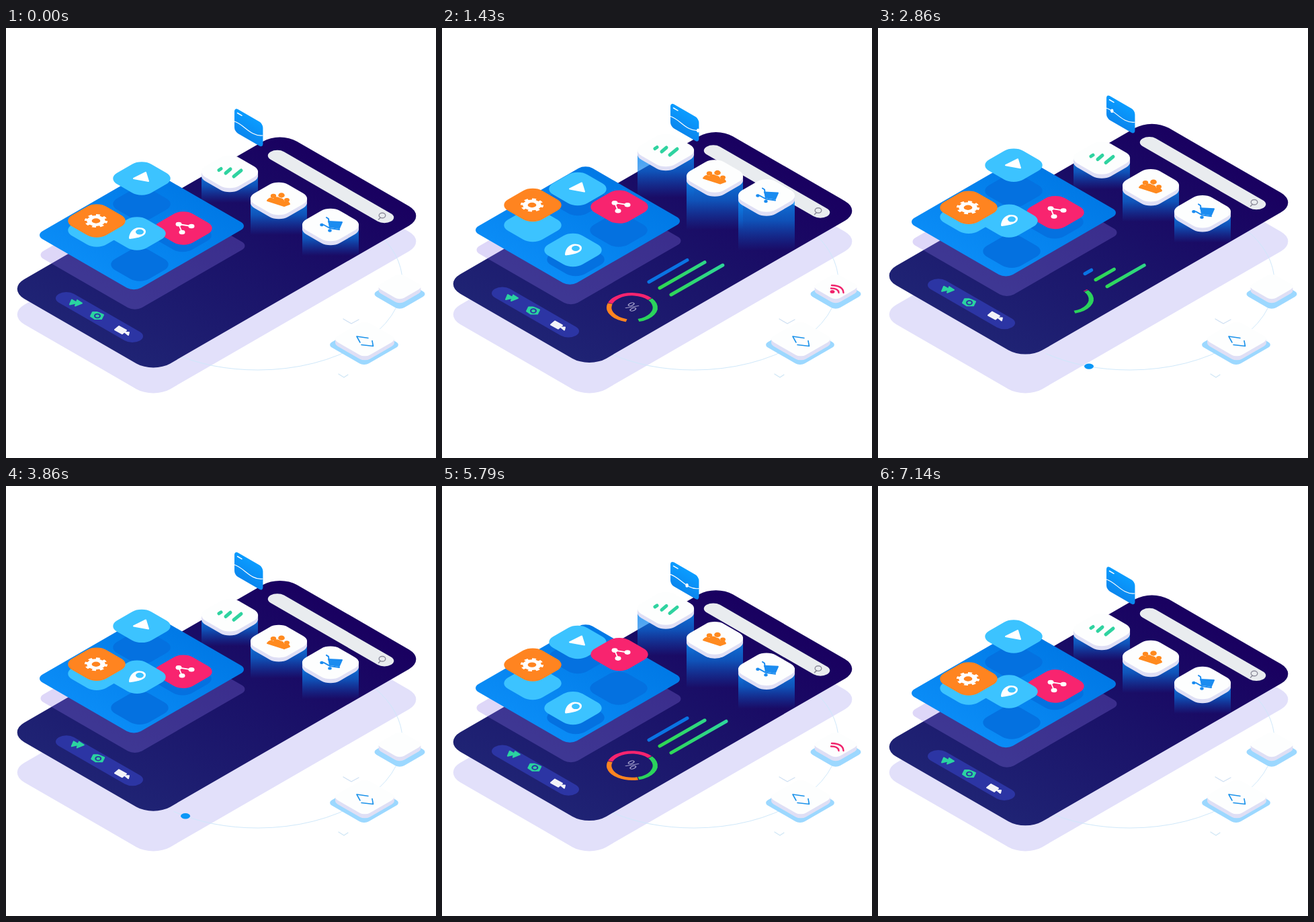
Recreate the animation shown at these times as an HTML page. Size 640 by 640 pixels, loop 7.21 s.

```html
<!DOCTYPE html>
<html lang="en">
<head>
<meta charset="utf-8">
<title>Isometric phone</title>
<style>
html, body { margin: 0; width: 100%; height: 100%; overflow: hidden; background: #fff; }
svg { display: block; width: 100%; height: 100%; }
</style>
</head>
<body>
<svg id="stage" viewBox="0 0 640 640"></svg>
<script>
const LOOP = 7210, HALF = LOOP / 2;
const stage = document.getElementById('stage');

// Rounded rectangle on the ground plane: w runs up-right, h runs down-right.
const iso = (x, y, w, h, r, fill, extra = '') =>
  `<rect x="${-w / 2}" y="${-h / 2}" width="${w}" height="${h}" rx="${r}" fill="${fill}" ${extra}
    transform="matrix(.866 -.5 .866 .5 ${x} ${y})"/>`;
const flat = (x, y, body) => `<g transform="translate(${x} ${y}) scale(1.2247 .7071)">${body}</g>`;
const line = (d, color, width, extra = '') =>
  `<path d="${d}" fill="none" stroke="${color}" stroke-width="${width}" stroke-linecap="round" stroke-linejoin="round" ${extra}/>`;
const shape = (d, fill) => `<path d="${d}" fill="${fill}" stroke="${fill}" stroke-width="2" stroke-linejoin="round"/>`;
const oval = (x, y, rx, ry, fill) => `<ellipse cx="${x}" cy="${y}" rx="${rx}" ry="${ry}" fill="${fill}"/>`;
const slab = (x, y, s, r, depth) =>
  [1, .66, .33].map(k => iso(x, y + depth * k, s, s, r, '#dfdff5')).join('') + iso(x, y, s, s, r, '#fdfefe');
const gradient = (id, stops, dir) =>
  `<linearGradient id="${id}" ${dir}>` +
  stops.map(([at, color, a = 1]) => `<stop offset="${at}" stop-color="${color}" stop-opacity="${a}"/>`).join('') +
  `</linearGradient>`;

const glyphs = {
  play: shape('M-12 0L6 -9L10 4Z', '#fff'),
  gear: flat(-1, 0, `<circle r="8.2" fill="none" stroke="#fff" stroke-width="6"/>
    <circle r="12" fill="none" stroke="#fff" stroke-width="4" pathLength="16" stroke-dasharray="1"/>`),
  pin: `<path d="M-12 7C-12 -1 -6 -9 3 -9C10 -9 13 -6 13 -3C13 3 5 6 -11 8Z" fill="#fff"/>` +
    oval(4, -2.5, 6, 4, '#3cc3ff'),
  share: line('M-2 6L-7 -6L12 -3', '#fff', 1.8) +
    oval(-7, -6, 4.5, 3.3, '#fff') + oval(12, -3, 4.5, 3.3, '#fff') + oval(-2, 6, 4.5, 3.3, '#fff'),
  bars: line('M-16 -2.5L-13 -4.5M-6 2L1 -4M6 7L17 -2', '#2fd3a0', 5),
  people: shape('M-17 3Q-13 -3 -8 1Q-4 -4 2 0Q8 1 7 5Q14 3 16 8L8 11Z', '#ff8a1f') +
    oval(-8, -4, 4.2, 3.2, '#ff8a1f') + oval(4, -5, 4.8, 3.7, '#ff8a1f') + oval(12, 2, 4, 3, '#ff8a1f'),
  cart: line('M-6 -11L-3 -9L-1 5L13 7M-10 0L-1 5', '#1b8cf0', 2) +
    shape('M-3 -5L17 -4L13 5L0 3Z', '#1b8cf0') +
    oval(-13, 0, 2.7, 2.2, '#1b8cf0') + oval(-1, 8.5, 2.7, 2.2, '#1b8cf0')
};

const ease = p => (1 - Math.cos(Math.PI * Math.min(1, Math.max(0, p)))) / 2;
// Rise at a, fall at b.
const pulse = (u, a, b, rise = 740, fall = 760) => ease((u - a) / rise) - ease((u - b) / fall);

const apps = [
  { id: 'play',  x: 202, y: 224, dy: 23,  a: 0,    b: 1900, fill: '#3cc3ff' },
  { id: 'share', x: 264, y: 298, dy: -40, a: 1010, b: 2250, fill: '#f8246f' },
  { id: 'pin',   x: 195, y: 306, dy: 32,  a: 640,  b: 2180, fill: '#3cc3ff' },
  { id: 'gear',  x: 135, y: 287, dy: -16, a: 280,  b: 1990, fill: '#ff8420' }
];
const towers = [
  { id: 'bars',   x: 333, y: 214, base: 260, dy: -24.5, a: 350, b: 2130 },
  { id: 'people', x: 406, y: 254, base: 308, dy: -26,   a: 150, b: 1930 },
  { id: 'cart',   x: 483, y: 293, base: 339, dy: -36,   a: 0,   b: 1700 }
];
const rows = [
  { x: 308, y: 385.5, len: 57, a: 330, color: '#0a74e4' },
  { x: 324, y: 394.5, len: 67, a: 560, color: 'url(#mint)' },
  { x: 341, y: 404.5, len: 82, a: 760, color: 'url(#mint)' }
];
const arcs = [
  { from: -74, len: 114, color: '#2bd35c' },
  { from: 40, len: 123, color: '#f8246f' },
  { from: 163, len: 123, color: '#ff8420' }
];
const tools = [
  { id: 'skip',  x: 104, y: 409, peak: 325, span: 300,
    art: shape('M-6 -4.5L2 0L-9 2.5ZM2 -4L9 0.5L-1 4.5Z', '#2bd3a0') },
  { id: 'photo', x: 135, y: 428, peak: 580, span: 450,
    art: shape('M-9 1L-6 -5L0 -5L3 -4L10 -1L7 5L-3 5Z', '#2bd3a0') + oval(1, 0.5, 5, 3.8, '#2c35a4') + oval(1, 0.5, 2.8, 2, '#2bd3a0') },
  { id: 'video', x: 172, y: 450, peak: 850, span: 380,
    art: shape('M-10 -1L-4 -6L7 0L1 5Z', '#f2f3f8') + shape('M5 3L11 3L10 7Z', '#f2f3f8') }
];

stage.innerHTML = `<defs>
  ${gradient('body', [[0, '#1f2374'], [.55, '#1a1168'], [1, '#190060']], '')}
  ${gradient('panel', [[0, '#0a8cf6'], [1, '#0079e6']], '')}
  ${gradient('beam', [[0, '#0e93fa', .85], [.45, '#0a7ae6', .65], [1, '#0a5fd0', 0]], 'x2="0" y2="1"')}
  ${gradient('card', [[0, '#0a9cff'], [1, '#0a86ee']], 'x2="0" y2="1"')}
  ${gradient('mint', [[0, '#2fd84e'], [1, '#2fd69c']], 'gradientUnits="userSpaceOnUse" x1="324" y1="400" x2="424" y2="360"')}
</defs>
${iso(313.5, 372, 468.5, 251, 29, '#e2e0fa')}
<ellipse cx="375" cy="378" rx="215" ry="131" fill="none" stroke="#cfe8fa" stroke-width="1"
  pathLength="360" stroke-dasharray="132 198 30"/>
<g id="orbiter">${oval(0, 0, 7, 4.2, '#0a97f7')}</g>

${iso(586, 396, 48, 48, 8, '#9cd8ff')}${slab(586, 385, 41, 8, 6)}
<g id="wave0">${oval(581, 392.5, 3.5, 2.5, '#f0246c')}</g>
<g id="wave1">${line('M579 387.5Q590 387.5 590.5 394', '#f0246c', 2.4)}</g>
<g id="wave2">${line('M580 383Q597 383.5 597.5 394', '#f0246c', 2.4)}</g>
${iso(533, 471.5, 63.5, 63.5, 8, '#9cd8ff')}${slab(534, 463, 56, 9, 6)}
${line('M539 461.5L522 459L527 468M545 465.5L546.5 473.5L529 471.5', '#1b92ea', 1.6)}
${line('M502 433L514 440L525 434', '#cfe0f3', 1.3)}
${line('M495 515L503 520L509 516', '#cfe6f5', 1.2)}

<g id="phone">
  ${iso(313.5, 334, 468.5, 251, 29, 'url(#body)')}
  ${iso(483.5, 236, 23, 207, 11.5, '#e9ecef')}
  ${line('M557.5 282L554.5 285', '#8d8d9b', 1.6)}
  <ellipse cx="560" cy="279" rx="4.8" ry="3.8" fill="none" stroke="#8d8d9b" stroke-width="1.4"/>
  ${iso(139, 430.5, 26, 139.4, 13, '#2c35a4')}
  ${tools.map(o => `<g id="${o.id}">${o.art}</g>`).join('')}
  ${iso(203.5, 331, 196, 169, 12, 'rgb(140,118,231)', 'fill-opacity=".29"')}
  ${rows.map((o, i) => line('', o.color, 5, `id="row${i}"`)).join('')}
  <g transform="translate(283 423.5) scale(1.2247 -.7071)">
    ${arcs.map((o, i) => `<circle id="arc${i}" r="28" fill="none" stroke="${o.color}" stroke-width="6"
      pathLength="360" transform="rotate(${o.from})"/>`).join('')}
  </g>
  <text id="percent" transform="matrix(.866 .5 -.866 .5 283 422.5)" y="7.5" text-anchor="middle"
    font-family="'Open Sans', sans-serif" font-size="21" fill="#a9a6cf">%</text>
  ${towers.map(o => `<rect id="${o.id}Beam" x="${o.x - 42}" width="84" fill="url(#beam)"/>
    <g id="${o.id}">${slab(0, 0, 58, 16, 6)}${glyphs[o.id]}</g>`).join('')}
  ${iso(202, 301.5, 196, 169, 12, 'url(#panel)')}
  ${iso(202, 262, 59, 59, 16.5, '#0471e0')}
  ${iso(135, 301, 59, 59, 16.5, '#3cc3ff')}
  ${iso(199, 352, 59, 59, 16.5, '#0471e0')}
  ${iso(263, 308.5, 59, 59, 16.5, '#0471e0')}
  ${apps.map(o => `<g id="${o.id}">${iso(0, 0, 59, 59, 16.5, o.fill)}${glyphs[o.id]}</g>`).join('')}
  <rect width="49" height="36" rx="6" fill="url(#card)" transform="matrix(.866 .5 0 1 340 118)"/>
  ${line('M344.5 126.5L351 130.3', '#fff', 1.5)}
  ${line('M340 139C354 143 364 162 382 160', '#fff', 1.2)}
  <g id="bead">${oval(0, 0, 2.2, 2.9, '#fff')}</g>
</g>`;

const parts = {};
stage.querySelectorAll('[id]').forEach(el => parts[el.id] = el);
const move = (id, x, y) => parts[id].setAttribute('transform', `translate(${x.toFixed(2)} ${y.toFixed(2)})`);
const show = (id, on) => parts[id].setAttribute('opacity', +on);
const within = (v, a, b) => v >= a && v < b;
const cubic = (s, a, b, c, d) => {
  const q = 1 - s;
  return q * q * q * a + 3 * q * q * s * b + 3 * q * s * s * c + s * s * s * d;
};

function draw(t) {
  const u = t % HALF;
  move('phone', 0, -11 * (1 - Math.cos(2 * Math.PI * t / LOOP)));

  for (const o of apps) move(o.id, o.x, o.y + o.dy * pulse(u, o.a, o.b));

  for (const o of towers) {
    const y = o.y + o.dy * pulse(u, o.a, o.b, 800, 820);
    move(o.id, o.x, y);
    parts[o.id + 'Beam'].setAttribute('y', y);
    parts[o.id + 'Beam'].setAttribute('height', o.base - y);
  }

  rows.forEach((o, i) => {
    const len = o.len * pulse(u, o.a, 2350 + i * 120, 800, 700);
    parts['row' + i].setAttribute('d', `M${o.x} ${o.y}l${len} ${-len * .572}`);
    show('row' + i, len > .5);
  });

  // The ring is drawn as one sweep shared by its three arcs.
  const sweep = 360 * pulse(u, 780, 2400, 800, 750);
  let start = 0;
  arcs.forEach((o, i) => {
    const len = Math.max(0, Math.min(o.len - 2, sweep - start));
    parts['arc' + i].setAttribute('stroke-dasharray', `${len} 400`);
    show('arc' + i, len > .2);
    start += o.len;
  });
  parts.percent.setAttribute('opacity', pulse(u, 950, 2450, 400, 400));

  const beat = t % (LOOP / 4);
  for (const o of tools) {
    const d = Math.abs(beat - o.peak) / o.span;
    const k = d < 1 ? 3.4 * Math.cos(d * Math.PI / 2) : 0;
    move(o.id, o.x + .866 * k, o.y - .75 * k);
  }

  const s = (t - 200 + LOOP) % (LOOP / 3) / 1250;
  show('bead', s < 1);
  if (s < 1) move('bead', cubic(s, 340, 354, 364, 382), cubic(s, 139, 143, 162, 160));

  const away = Math.abs(t - 3570) / 2200;
  show('orbiter', away < 1);
  const angle = (126 - 90 * Math.min(1, away) ** 1.35) * Math.PI / 180;
  move('orbiter', 375 + 215 * Math.cos(angle), 378 + 131 * Math.sin(angle));

  show('wave0', within(u, 950, 2130));
  show('wave1', within(u, 700, 1750) || within(u, 2130, 2500));
  show('wave2', within(u, 1100, 2500));
}

function tick() {
  draw(performance.now() % LOOP);
  requestAnimationFrame(tick);
}
tick();
</script>
</body>
</html>
```
